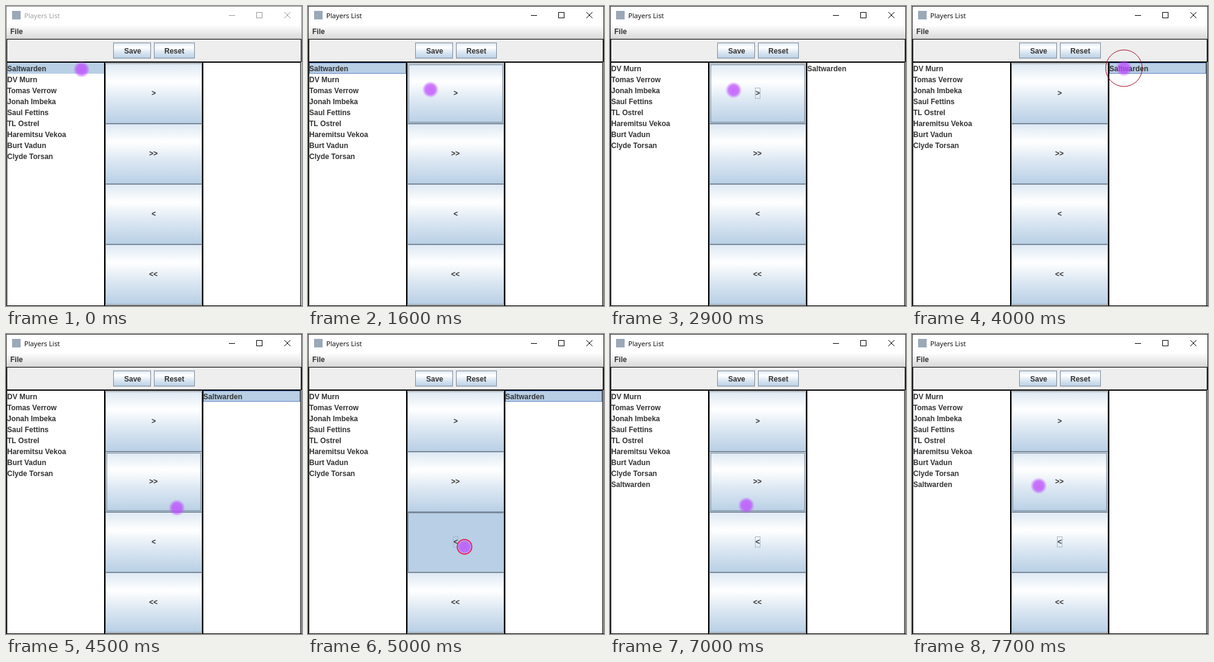
An HTML page with a canvas for the animation above (8000 ms loop, 486 by 492 pixels).

```html
<!DOCTYPE html>
<html lang="en">
<head>
<meta charset="utf-8">
<title>Players List</title>
<style>
html, body { margin: 0; width: 100%; height: 100%; overflow: hidden; background: #fff; }
canvas { display: block; }
</style>
</head>
<body>
<canvas id="stage" width="486" height="492"></canvas>
<script>
const ctx = document.getElementById('stage').getContext('2d');
const LOOP = 8000, STEP = 100;
const EDGE = '#7a8a99', PICK = '#b8cfe5', INK = '#333';
const BOLD = 'bold 12px "Liberation Sans", Arial, sans-serif';
const TITLE = '11.2px "Open Sans", "Noto Sans", sans-serif';

const HERO = 'Saltwarden';
const OTHERS = ['DV Murn', 'Tomas Verrow', 'Jonah Imbeka', 'Saul Fettins',
  'TL Ostrel', 'Haremitsu Vekoa', 'Burt Vadun', 'Clyde Torsan'];
const ARROWS = ['>', '>>', '<', '<<'].map((label, i) =>
  ({ label, x: 163, y: 94 + 99 * i, w: 159, h: 99, tx: label.length > 1 ? 235 : 239 }));

// Pointer path: time, x, y
const PATH = [
  [0, 124, 104], [1300, 124, 104], [1600, 201, 137], [1800, 203, 138],
  [3100, 203, 138], [3800, 348, 102], [4300, 348, 102], [4600, 257, 349],
  [6000, 257, 349], [6100, 258, 350], [6500, 258, 350], [7300, 208, 249]
];
const CLICKS = [900, 1800, 4000, 4800];

const between = (t, a, b) => t >= a && t < b;
const ease = k => k * k * (3 - 2 * k);

function pointerAt(t) {
  const i = PATH.findIndex(p => p[0] > t);
  if (i < 0) return PATH[PATH.length - 1].slice(1);
  const [t0, x0, y0] = PATH[i - 1], [t1, x1, y1] = PATH[i];
  const k = ease((t - t0) / (t1 - t0));
  return [x0 + (x1 - x0) * k, y0 + (y1 - y0) * k];
}

function fill(color, x, y, w, h) {
  ctx.fillStyle = color;
  ctx.fillRect(x, y, w, h);
}

function frame(color, x, y, w, h) {
  ctx.strokeStyle = color;
  ctx.lineWidth = 1;
  ctx.strokeRect(x + 0.5, y + 0.5, w - 1, h - 1);
}

function text(str, x, y, color = INK, font = BOLD) {
  ctx.font = font;
  ctx.fillStyle = color;
  ctx.fillText(str, x, y);
}

function shade(y, h, stops) {
  const g = ctx.createLinearGradient(0, y, 0, y + h);
  stops.forEach(([at, color]) => g.addColorStop(at, color));
  return g;
}

function button({ label, x, y, w, h, tx }, { hover, down, focus } = {}) {
  const mid = y + Math.floor(h / 2);
  if (down) {
    fill(PICK, x, y, w, h);
    fill(EDGE, x, y, w, 2);
    fill(EDGE, x, y, 2, h);
  } else {
    fill(shade(y, h, [[0, '#dde8f3'], [0.3, '#fff'], [0.6, '#dde8f3'], [1, PICK]]), x, y, w, h);
    if (hover) frame(EDGE, x + 2, y + 2, w - 4, h - 4);
  }
  frame(EDGE, x, y, w, h);
  if (focus) frame('#a3b8cc', 238, mid - 9, 9, 18);
  text(label, tx, mid + (h > 50 ? 4 : 5));
}

function list(x, w, names, picked, focused) {
  frame('#000', x, 92, w, 400);
  fill('#fff', x + 1, 93, w - 2, 398);
  names.forEach((name, i) => {
    const y = 93 + 18 * i;
    if (name === picked) {
      fill(PICK, x + 1, y, w - 2, 18);
      if (focused) frame('#6382bf', x + 1, y, w - 2, 18);
    }
    text(name, x + 1, y + 14);
  });
}

function line(x0, y0, x1, y1) {
  ctx.beginPath();
  ctx.moveTo(x0, y0);
  ctx.lineTo(x1, y1);
  ctx.stroke();
}

function titleBar(active) {
  const color = active ? '#000' : '#999';
  fill('#fff', 0, 0, 486, 31);
  fill('#9aa8b8', 10, 8, 14, 14);
  text('Players List', 30, 20, color, TITLE);
  fill(color, 366, 15, 10, 1);
  frame(color, 411, 10, 10, 10);
  ctx.strokeStyle = color;
  line(457, 10, 467, 20);
  line(467, 10, 457, 20);
}

function pointer(x, y) {
  const g = ctx.createRadialGradient(x, y, 0, x, y, 13.5);
  g.addColorStop(0, 'rgba(190,75,255,0.8)');
  g.addColorStop(0.6, 'rgba(190,75,255,0.74)');
  g.addColorStop(1, 'rgba(190,75,255,0)');
  ctx.fillStyle = g;
  ctx.beginPath();
  ctx.arc(x, y, 13.5, 0, 7);
  ctx.fill();
}

function ring(x, y, k) {
  ctx.strokeStyle = `rgb(${160 + 45 * k},8,${32 + 8 * k})`;
  ctx.lineWidth = 1 + k * 0.2;
  ctx.beginPath();
  ctx.arc(x, y, 30 - 9 * k, 0, 7);
  ctx.stroke();
}

function draw(t) {
  const active = t >= 900;
  const [px, py] = pointerAt(t);
  const moved = between(t, 2100, 5200);

  fill('#eee', 0, 0, 486, 492);
  titleBar(active);
  fill(shade(31, 22, [[0, '#fff'], [1, '#dadada']]), 1, 31, 484, 22);
  fill('#ccc', 1, 53, 484, 1);
  text('File', 7, 46);

  frame('#000', 1, 54, 484, 38);
  button({ label: 'Save', x: 176, y: 60, w: 62, h: 26, tx: 194 });
  button({ label: 'Reset', x: 243, y: 60, w: 67, h: 26, tx: 260 });

  const left = moved ? OTHERS : t < 2100 ? [HERO, ...OTHERS] : [...OTHERS, HERO];
  list(1, 161, left, t < 2100 ? HERO : '', between(t, 900, 1800));
  list(323, 161, moved ? [HERO] : [], t >= 4000 ? HERO : '', true);

  frame('#000', 162, 92, 161, 400);
  const focused = between(t, 1800, 4000) ? 0 : t >= 4800 ? 2 : -1;
  const held = between(t, 1800, 2100) ? 0 : between(t, 4800, 5200) ? 2 : -1;
  ARROWS.forEach((b, i) => button(b, {
    hover: between(px, b.x, b.x + b.w) && between(py, b.y, b.y + b.h),
    down: i === held,
    focus: i === focused
  }));

  frame(active ? '#333' : '#8a8a8a', 0, 0, 486, 493);
  fill('#000', 1, 491, 484, 1);

  pointer(px, py);
  CLICKS.forEach(c => {
    const k = (t - c) / STEP;
    if (between(k, 0, 3)) ring(px, py, k);
  });
}

const start = performance.now();
function tick() {
  const t = (performance.now() - start) % LOOP;
  draw(Math.floor(t / STEP) * STEP);
  requestAnimationFrame(tick);
}
tick();
</script>
</body>
</html>
```
